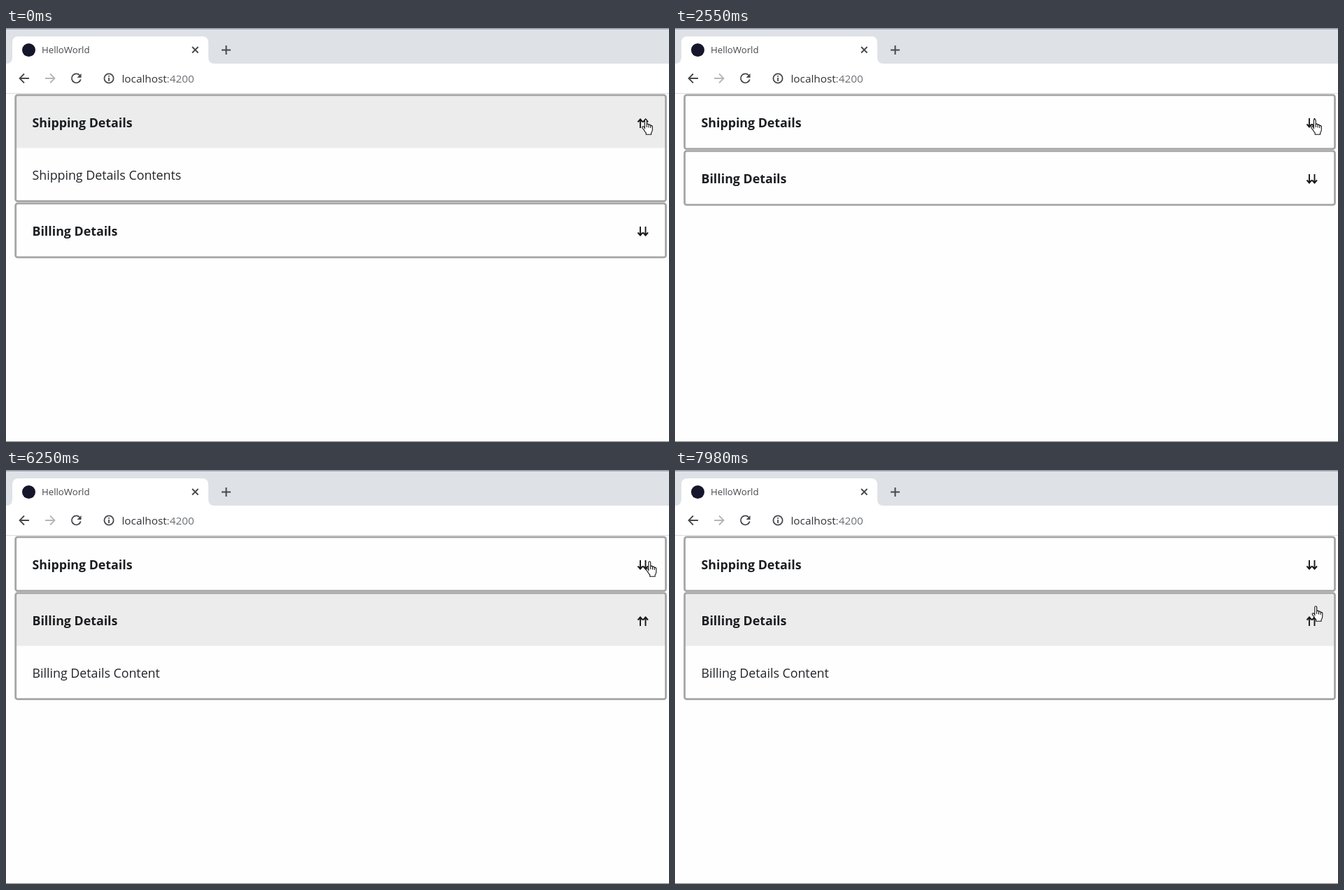
Write an HTML page that moves like this. It is 947 by 592 pixels and loops after 8 s.

```html
<!DOCTYPE html>
<html lang="en">
<head>
<meta charset="utf-8">
<title>HelloWorld</title>
<style>
  html, body { margin: 0; width: 100%; height: 100%; overflow: hidden; background: #fefefe; }
  svg { display: block; }
  text { font-family: "Open Sans", "Noto Sans", sans-serif; font-size: 17.8px; fill: #212529; }
  .title { font-weight: 700; fill: #1b1d20; }
  .icon { fill: none; stroke: #45484c; stroke-width: 1.8; }
  .arrows { fill: none; stroke: #17191c; stroke-width: 1.9; }
  .frame { fill: none; stroke: #a5a5a5; stroke-width: 2.8; }
</style>
</head>
<body>
<svg width="947" height="592" viewBox="0 0 947 592">
  <!-- browser window -->
  <rect width="947" height="51" fill="#dee1e6"/>
  <rect y="0.4" width="947" height="1.2" fill="#6f7d8c"/>
  <path d="M0 51Q9 51 9 42V21Q9 12 18 12H280Q289 12 289 21V42Q289 51 298 51Z" fill="#fff"/>
  <rect y="51" width="947" height="42" fill="#fff"/>
  <rect y="93" width="947" height="1" fill="#dcdddf"/>
  <rect y="591" width="947" height="1" fill="#858585"/>
  <circle cx="32.5" cy="31.5" r="9.5" fill="#15152b"/>
  <text x="51" y="36" style="font-size:13.2px;fill:#45484c">HelloWorld</text>
  <text x="165.5" y="78" style="font-size:15.3px;fill:#2f3236">localhost<tspan fill="#6b6f74">:4200</tspan></text>
  <g class="icon">
    <path d="M266 27L274.5 35.5M274.5 27L266 35.5"/>
    <path d="M308 31.5H321M314.5 25V38" stroke-width="2"/>
    <path d="M33 72H19.5M26 65.5L19.5 72L26 78.5"/>
    <path d="M56 72H69.5M63 65.5L69.5 72L63 78.5" stroke="#b4b6b9"/>
    <path d="M105.2 67.5A6.5 6.5 0 1 0 106.7 73.5"/>
    <path d="M107.5 65V71H101.5Z" fill="#45484c" stroke="none"/>
    <circle cx="147" cy="72" r="6.6"/>
    <path d="M147 71V76M147 68V69.8"/>
  </g>

  <!-- accordion -->
  <g id="panels"></g>

  <path id="hand" fill="#fff" stroke="#111" stroke-width="1.1" stroke-linejoin="round"
    d="M4.3 14.5V2.3Q4.3 .7 5.75 .7T7.2 2.3V11.5V7.6Q8.6 6.6 10 8V12V8.4Q11.4 7.5 12.7 9V12.5V9.6Q14 8.8 15.3 10.6V15.5Q15.3 18 13.6 19.8V22.3H6.2V20Q4.5 18.5 3 15.5L.9 12.8Q.2 11.2 1.8 10.8Q3 10.9 4.3 12.8"/>
</svg>

<script>
const LOOP = 8000, TOP = 95, HEAD = 79.8, BODY = 74.8;
const DOWN = "M906 129V141M902.5 137.5L906 141.5L909.5 137.5M913.5 129V141M910 137.5L913.5 141.5L917 137.5";
const UP = "M906 143V131M902.5 134.5L906 130.5L909.5 134.5M913.5 143V131M910 134.5L913.5 130.5L917 134.5";

// Times at which each panel is toggled
const panels = [
  { name: "Shipping", body: "Contents", open: true, clicks: [910, 1960, 2550, 6680, 7550] },
  { name: "Billing", body: "Content", open: false, clicks: [3900, 4780, 5500] }
];

// Pointer stops: time, x, y
const stops = [
  [0, 908, 130], [2820, 903, 197], [2980, 906, 231.5], [3130, 910, 229.5],
  [3280, 902.5, 210], [5800, 912, 143.5], [5950, 917, 130], [6100, 912.5, 130],
  [6250, 913.5, 130], [7700, 913, 150], [7830, 912.5, 176.5], [7980, 909.5, 194]
];

const root = document.getElementById("panels");
const hand = document.getElementById("hand");

function panelSvg(p, open, y) {
  const height = HEAD + (open ? BODY : 0);
  const label = `${p.name} Details`;
  return `<g transform="translate(0 ${Math.round(y - TOP)})">` +
    (open ? `<rect x="14" y="97" width="928" height="74.5" fill="#ececec"/>` : "") +
    `<rect class="frame" x="13.7" y="95.9" width="928.8" height="${height - 2.8}" rx="3"/>` +
    `<text class="title" x="37.5" y="142">${label}</text>` +
    `<path class="arrows" d="${open ? UP : DOWN}"/>` +
    (open ? `<text x="37.5" y="217">${label} ${p.body}</text>` : "") + `</g>`;
}

let shown = "";
function draw(t) {
  const open = panels.map(p => p.open !== (p.clicks.filter(c => c <= t).length % 2 === 1));
  if (String(open) !== shown) {
    shown = String(open);
    let y = TOP;
    root.innerHTML = panels.map((p, i) => {
      const part = panelSvg(p, open[i], y);
      y += HEAD + (open[i] ? BODY : 0);
      return part;
    }).join("");
  }
  const [, x, y] = stops.filter(s => s[0] <= t).pop();
  hand.setAttribute("transform", `translate(${x} ${y})`);
}

const start = performance.now();
function tick() {
  draw((performance.now() - start) % LOOP);
  requestAnimationFrame(tick);
}
tick();
</script>
</body>
</html>
```
